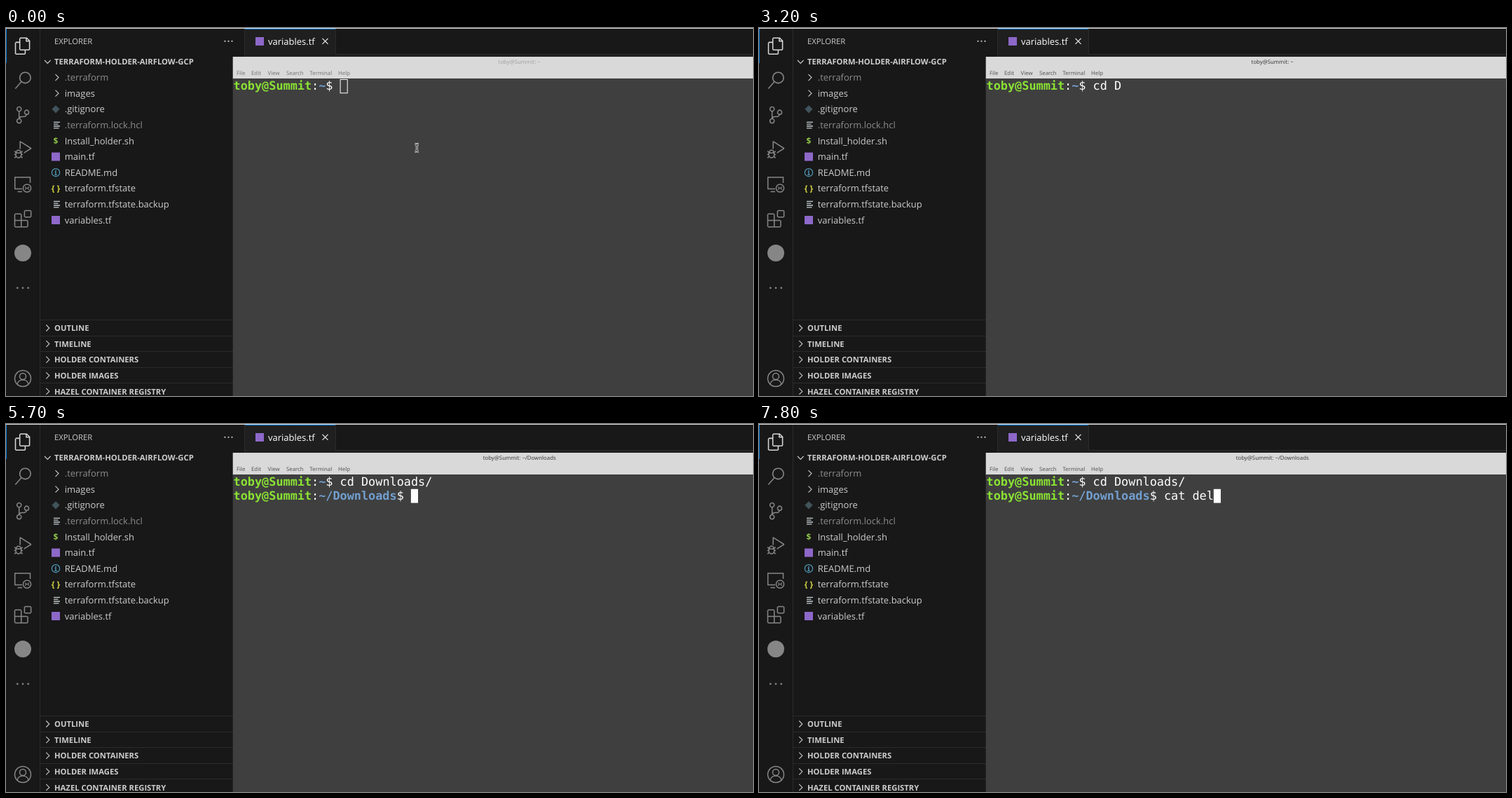
An HTML page that plays this animation: 1066x525 px, repeating every 8 s.

```html
<!DOCTYPE html>
<html lang="en">
<head>
<meta charset="utf-8">
<title>Terminal session</title>
<style>
html, body { margin: 0; width: 100%; height: 100%; overflow: hidden; background: #181818; }
svg { display: block; width: 1066px; height: 525px; }
text { font: 13px "Open Sans", "Noto Sans", sans-serif; fill: #ccc; white-space: pre; text-rendering: geometricPrecision; }
.dim { fill: #8c8c8c; }
.head { font-size: 11.25px; font-weight: 700; }
.win text { font: 7.8px "Noto Sans", "Open Sans", sans-serif; fill: #555; }
.win #title { text-anchor: middle; fill: #3c3c3c; }
.win.idle text { fill: #777; }
.win.idle #title { fill: #a2a2a2; }
.term text { font: 16.83px "DejaVu Sans Mono", monospace; fill: #fff; }
.user { fill: #8ae234; font-weight: 700; }
.path { fill: #729fcf; font-weight: 700; }
.solid { fill: #868686; }
.line { fill: none; stroke: #868686; stroke-width: 1.5; }
.chev { fill: none; stroke: #ccc; stroke-width: 1.1; }
.rule { stroke: #2b2b2b; }
</style>
</head>
<body>
<svg viewBox="0 0 1066 525">
  <rect width="1066" height="525" fill="#181818"/>
  <rect x="341" y="37" width="725" height="488" fill="#1f1f1f"/>
  <path class="rule" d="M48.5 1V525M340.5 1V41M341 37.5H1066M470.5 1V37"/>
  <rect x="341" y="1" width="129" height="37" fill="#1f1f1f"/>
  <rect x="341" y="1" width="129" height="1" fill="#0078d4"/>
  <rect width="1066" height="1" fill="#dedede"/>
  <rect y="1" width="1" height="49" fill="#0078d4"/>

  <!-- activity bar -->
  <g class="solid">
    <path transform="translate(11.7 13.4) scale(1.03)" fill="#d7d7d7" d="M17.5 0h-9L7 1.5V6H2.5L1 7.5v15.07L2.5 24h12.07L16 22.57V18h4.7l1.3-1.43V4.5L17.5 0zm0 2.12l2.38 2.38H17.5V2.12zm-3 20.38h-12v-15H7v9.07L8.5 18h6v4.5zm6-6h-12v-15H16V6h4.5v10.5z"/>
    <path transform="translate(11.7 62.4) scale(1.03)" d="M15.25 0a8.25 8.25 0 0 0-6.18 13.72L1 22.88l1.12 1 8.05-9.12A8.25 8.25 0 1 0 15.25 0zm0 15a6.75 6.75 0 1 1 0-13.5 6.75 6.75 0 0 1 0 13.5z"/>
    <path transform="translate(11.7 111.8) scale(1.03)" d="M21 8.22A3.74 3.74 0 0 0 15.05 5.2a3.74 3.74 0 0 0 1.15 6.58 3 3 0 0 1-2.67 1.67h-3a4.46 4.46 0 0 0-2.98 1.17V7.4a3.74 3.74 0 1 0-1.5 0v9.12a3.78 3.78 0 1 0 1.82.1 3 3 0 0 1 2.67-1.67h3a4.48 4.48 0 0 0 4.22-3.04A3.74 3.74 0 0 0 21 8.22zM4.57 3.74a2.24 2.24 0 1 1 4.48 0 2.24 2.24 0 0 1-4.48 0zm4.48 16.44a2.24 2.24 0 1 1-4.48 0 2.24 2.24 0 0 1 4.48 0zm8.22-9.72a2.24 2.24 0 1 1 0-4.48 2.24 2.24 0 0 1 0 4.48z"/>
    <path transform="translate(11.7 161.2) scale(1.03)" d="M10.94 13.5l-1.32 1.32a3.73 3.73 0 0 0-7.24 0L1.06 13.5 0 14.56l1.72 1.72-.22.22V18H0v1.5h1.5v.08c.08.49.21.97.41 1.42L0 22.94 1.06 24l1.65-1.65A4.3 4.3 0 0 0 6 24a4.3 4.3 0 0 0 3.29-1.65L10.94 24 12 22.94 10.09 21c.2-.46.34-.95.41-1.45v-.1H12V18h-1.5v-1.5l-.22-.22L12 14.56l-1.06-1.06zM6 13.5a2.25 2.25 0 0 1 2.25 2.25h-4.5A2.25 2.25 0 0 1 6 13.5zm3 6a3.33 3.33 0 0 1-3 3 3.33 3.33 0 0 1-3-3v-2.25h6v2.25zm14.76-9.9v1.26L13.5 17.37V15.6l8.5-5.37L9 2v9.46a5.07 5.07 0 0 0-1.5-.72V.63L8.64 0l15.12 9.6z"/>
    <path transform="translate(11.7 259.8) scale(1.03)" d="M13.5 1.5L15 0h7.5L24 1.5V9l-1.5 1.5H15L13.5 9V1.5zm1.5 0V9h7.5V1.5H15zM0 15V6l1.5-1.5H9L10.5 6v7.5H18l1.5 1.5v7.5L18 24H1.5L0 22.5V15zm9-1.5V6H1.5v7.5H9zM9 15H1.5v7.5H9V15zm1.5 7.5H18V15h-7.5v7.5z"/>
    <circle cx="24" cy="321" r="12"/>
    <circle cx="16.3" cy="370.8" r="1.4"/><circle cx="24" cy="370.8" r="1.4"/><circle cx="31.7" cy="370.8" r="1.4"/>
  </g>
  <g class="line">
    <path d="M23 229.5H12.7V213H34.5V221M16.5 233.5H23"/>
    <circle cx="30" cy="228.5" r="5.6"/>
    <path d="M27.2 226.5L29.3 228.5L27.2 230.5M32.8 226.5L30.7 228.5L32.8 230.5" stroke-width="1.1"/>
    <circle cx="24" cy="500" r="11.5"/><circle cx="24" cy="497" r="4.5"/>
    <path d="M16 508.5C17 499.8 31 499.8 32 508.5"/>
  </g>

  <!-- explorer -->
  <text x="69" y="23" style="font-size:11.3px">EXPLORER</text>
  <g fill="#ccc"><circle cx="312.5" cy="18.8" r="1.1"/><circle cx="317.5" cy="18.8" r="1.1"/><circle cx="322.5" cy="18.8" r="1.1"/></g>
  <path class="chev" d="M55 46L59.3 50.5L63.6 46"/>
  <text class="head" x="69" y="52.2">TERRAFORM-HOLDER-AIRFLOW-GCP</text>
  <g id="files"></g>
  <g id="sections"></g>

  <!-- editor tab -->
  <rect x="356" y="13" width="12" height="12" fill="#8d68c9"/>
  <text x="374" y="23.5" style="fill:#fff">variables.tf</text>
  <path d="M451.5 14.8L459.5 22.8M459.5 14.8L451.5 22.8" stroke="#eee" stroke-width="1.2"/>

  <!-- terminal window -->
  <g class="win" id="win">
    <rect x="323.7" y="41" width="743" height="32" fill="#d9d9d9"/>
    <text id="title" x="732.7" y="51.4"></text>
    <text x="329" y="67">File</text><text x="350" y="67">Edit</text><text x="373.5" y="67">View</text>
    <text x="400" y="67">Search</text><text x="433.3" y="67">Terminal</text><text x="474" y="67">Help</text>
  </g>
  <g class="term">
    <rect x="323.7" y="72" width="743" height="453" fill="#3f3f3f"/>
    <text id="row0" x="324.6" y="88.3"></text>
    <text id="row1" x="324.6" y="108.1"></text>
    <rect id="cursor" stroke="#fff"/>
  </g>
  <path id="pointer" d="M583.5 165.5Q586.3 165.5 586.3 167.5Q586.3 165.5 589 165.5M586.3 167V175M583.5 176.3Q586.3 176.3 586.3 174.3Q586.3 176.3 589 176.3" fill="none"/>
</svg>
<script>
const $ = id => document.getElementById(id);
const HOST = 'toby@Summit', LOOP = 8000, CELL = 16.83 * 0.602, ROW = 19.8;
const chevron = (x, y) => `<path class="chev" d="M${x - 2} ${y - 4.5}L${x + 2.5} ${y}L${x - 2} ${y + 4.5}"/>`;
const square = color => y => `<rect x="65" y="${y - 6}" width="12" height="12" fill="${color}"/>`;
const glyph = (s, color) => y =>
  `<text x="71" y="${y + 4.3}" text-anchor="middle" style="fill:${color};font-weight:700;font-size:12px">${s}</text>`;

const icons = {
  dir: y => chevron(72.5, y),
  tf: square('#8d68c9'),
  git: y => `<rect x="67" y="${y - 4}" width="8" height="8" fill="#41535b" transform="rotate(45 71 ${y})"/>`,
  list: y => `<path d="M68 ${y - 4}h9M68 ${y - 1.2}h6.5M68 ${y + 1.6}h9M68 ${y + 4.4}h7.5" stroke="#c5cdd1" stroke-width="1.3"/>`,
  shell: glyph('$', '#8dc149'),
  json: glyph('{ }', '#cbcb41'),
  info: y => `<circle cx="71" cy="${y}" r="5.6" fill="none" stroke="#519aba" stroke-width="1.2"/>
    <path d="M71 ${y - 3.4}v1.6M69.7 ${y - .7}h1.3v4M69.3 ${y + 3.2}h3.4" fill="none" stroke="#519aba" stroke-width="1.3"/>`
};

const files = [
  ['dir', '.terraform', 'dim'], ['dir', 'images'], ['git', '.gitignore'],
  ['list', '.terraform.lock.hcl', 'dim'], ['shell', 'Install_holder.sh'], ['tf', 'main.tf'],
  ['info', 'README.md'], ['json', 'terraform.tfstate'], ['list', 'terraform.tfstate.backup'],
  ['tf', 'variables.tf']
];
$('files').innerHTML = files.map(([icon, name, cls = ''], i) => {
  const y = 70.6 + i * 22.6;
  return icons[icon](y) + `<text class="${cls}" x="83.7" y="${y + 4.5}">${name}</text>`;
}).join('');

const sections = ['OUTLINE', 'TIMELINE', 'HOLDER CONTAINERS', 'HOLDER IMAGES', 'HAZEL CONTAINER REGISTRY'];
$('sections').innerHTML = sections.map((name, i) => {
  const y = 428 + i * 22.6, top = Math.round(y - 12) + .5;
  return `<path class="rule" d="M49 ${top}H324"/>` + chevron(59.3, y) +
    `<text class="head" x="69" y="${y + 4.2}">${name}</text>`;
}).join('');

// [start time, first command, second command or null, cursor lit]
const steps = [
  [0, '', null, true], [900, '', null, false],
  [1200, 'c', null, true], [1400, 'cd', null, true], [1600, 'cd ', null, true],
  [2400, 'cd ', null, false], [2500, 'cd D', null, true], [3200, 'cd D', null, false],
  [3900, 'cd D', null, true], [4100, 'cd Do', null, true], [4200, 'cd Dow', null, true],
  [4400, 'cd Down', null, true], [4700, 'cd Downloads/', null, true], [5300, 'cd Downloads/', null, false],
  [5700, 'cd Downloads/', '', true], [6000, 'cd Downloads/', 'c', true], [6100, 'cd Downloads/', 'ca', true],
  [6400, 'cd Downloads/', 'cat', true], [6600, 'cd Downloads/', 'cat ', true], [7200, 'cd Downloads/', 'cat ', false],
  [7500, 'cd Downloads/', 'cat d', true], [7700, 'cd Downloads/', 'cat de', true], [7800, 'cd Downloads/', 'cat del', true]
];
const prompt = (dir, cmd) =>
  `<tspan class="user">${HOST}</tspan>:<tspan class="path">${dir}</tspan>$ ${cmd}`;
const set = (el, attrs) => Object.entries(attrs).forEach(([k, v]) => el.setAttribute(k, v));

// the I-beam is a dark stroke over a wider light one
const halo = $('pointer').cloneNode();
halo.id = 'halo';
set(halo, { stroke: '#eee', 'stroke-width': 2.8 });
set($('pointer'), { stroke: '#111', 'stroke-width': 1 });
$('pointer').before(halo);

let shown = '';
function draw(t) {
  const idle = t < 300;
  const step = steps.findLast(s => s[0] <= t);
  const key = step[0] + ':' + idle;
  if (key === shown) return;
  shown = key;
  const [start, first, second, lit] = step;
  const row = second === null ? 0 : 1;
  const dir = row ? '~/Downloads' : '~';
  $('win').setAttribute('class', idle ? 'win idle' : 'win');
  $('title').textContent = `${HOST}: ${dir}`;
  $('row0').innerHTML = prompt('~', first);
  $('row1').innerHTML = row ? prompt(dir, second) : '';
  const col = HOST.length + dir.length + 3 + (row ? second : first).length;
  const inset = idle ? .5 : 0;
  set($('cursor'), {
    x: 324.6 + col * CELL + inset, y: 73 + row * ROW + inset,
    width: CELL, height: ROW - inset,
    fill: idle ? 'none' : '#fff', 'stroke-width': idle ? 1 : 0,
    visibility: lit ? 'visible' : 'hidden'
  });
  for (const id of ['pointer', 'halo']) $(id).setAttribute('visibility', start < 1200 ? 'visible' : 'hidden');
}

const origin = performance.now();
function tick() {
  draw((performance.now() - origin) % LOOP);
  requestAnimationFrame(tick);
}
tick();
</script>
</body>
</html>
```
